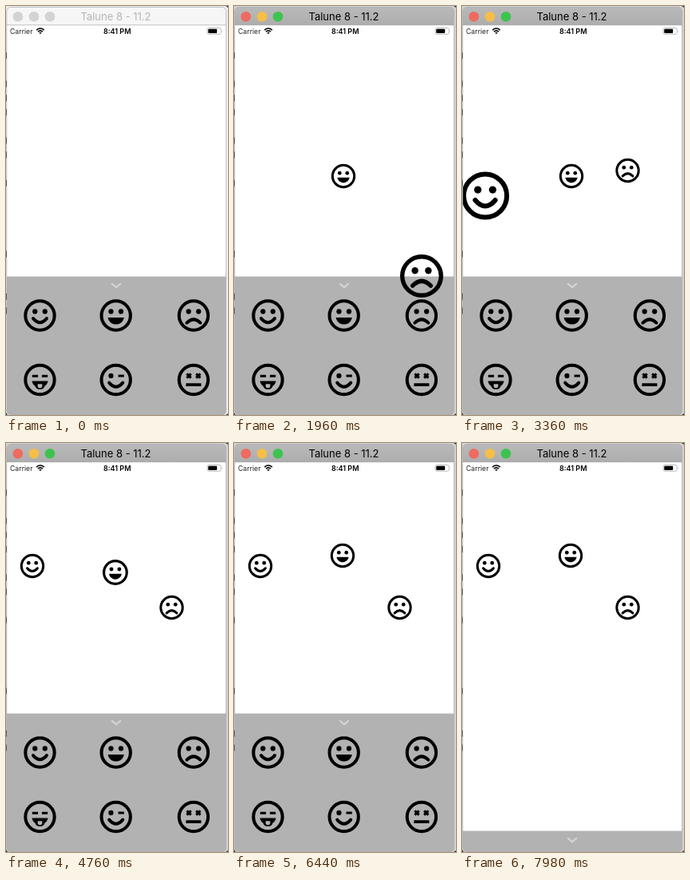
These frames come from a looping animation (278 by 512 pixels, 8000 ms). An HTML page:

```html
<!DOCTYPE html>
<html lang="en">
<head>
<meta charset="utf-8">
<title>Sticker tray</title>
<style>
  html, body { margin: 0; height: 100%; overflow: hidden; background: #fff; }
  svg { display: block; width: 100vw; height: 100vh; }
  text { font-family: Inter, "Liberation Sans", sans-serif; }
  .line { fill: none; stroke: #000; stroke-width: 2; stroke-linecap: round; }
  .thin { fill: none; stroke: #000; stroke-width: 1.5; }
  .inactive .lights circle { fill: #d3d3d3; }
  .inactive #bar { fill: #f6f6f6; }
  .inactive #title { fill: #b4b4b4; }
  .inactive #backdrop { fill: #efefef; }
</style>
</head>
<body>
<svg id="stage" viewBox="0 0 278 512">
  <defs>
    <linearGradient id="barFill" x2="0" y2="1">
      <stop stop-color="#bababa"/><stop offset="1" stop-color="#adadad"/>
    </linearGradient>
    <clipPath id="windowShape"><rect x="1" y="1.5" width="274.5" height="510.5" rx="5"/></clipPath>

    <!-- Faces are centred on 0,0 with an outer radius of 10. -->
    <circle id="ring" r="9" class="line"/>
    <circle id="eye" cy="-2.5" r="1.55"/>
    <g id="eyes"><use href="#eye" x="-3.1"/><use href="#eye" x="3.1"/></g>
    <path id="curve" class="line" d="M-4.2 1.8Q0 6.8 4.2 1.8"/>
    <path id="cross" class="thin" d="M-1.3-3.8l2.6 2.6m0-2.6l-2.6 2.6"/>
    <g id="smile"><use href="#ring"/><use href="#eyes"/><use href="#curve"/></g>
    <g id="grin"><use href="#ring"/><use href="#eyes"/><path d="M-5 1.2H5C4 6.9-4 6.9-5 1.2"/></g>
    <g id="sad"><use href="#ring"/><use href="#eyes"/><path class="line" d="M-4.2 4.5Q0 .3 4.2 4.5"/></g>
    <g id="tongue"><use href="#ring"/>
      <path class="thin" d="M-4.8-2.4h3.6M1.2-2.4h3.6"/>
      <path fill-rule="evenodd" d="M-5 .8H5Q4.4 3.2 2.9 3.9A3 2.6 0 0 1-2.9 3.9Q-4.4 3.2-5 .8M-1.4 2.6v1.2a1.4 1.2 0 0 0 2.8 0v-1.2z"/></g>
    <g id="wink"><use href="#ring"/><use href="#eye" x="-3.1"/>
      <path class="thin" d="M1.4-2.5h3.6"/><use href="#curve"/></g>
    <g id="dead"><use href="#ring"/><use href="#cross" x="-2.9"/><use href="#cross" x="2.9"/>
      <path class="thin" style="stroke-width:1.9" d="M-4.7 3H4.7"/></g>
  </defs>

  <rect id="backdrop" width="278" height="512" fill="#d2d2d2"/>
  <path d="M275 0h3v2zM275 512h3v-2zM0 512h2l-2-3z" fill="#333"/>
  <g id="specks"></g>

  <g clip-path="url(#windowShape)">
    <rect width="278" height="512" fill="#fff"/>
    <rect id="bar" width="278" height="24" fill="url(#barFill)"/>
    <path d="M0 23.8H278" stroke="#a9a9a9" stroke-width=".7"/>
    <g class="lights">
      <circle cx="14.9" cy="13.2" r="6.3" fill="#ef6a60"/>
      <circle cx="35" cy="13.2" r="6.3" fill="#f6be47"/>
      <circle cx="55" cy="13.2" r="6.3" fill="#3cc44f"/>
    </g>
    <text id="title" x="137.5" y="18" font-size="13" text-anchor="middle">Talune 8 - 11.2</text>

    <text x="5" y="34.6" font-size="8.7" fill="#222">Carrier</text>
    <g fill="none" stroke="#000" stroke-width="1.6">
      <path d="M38.2 30.2Q43 25.8 47.8 30.2M40 32.2Q43 29.4 46 32.2"/>
      <path d="M43 35.2l-1.7-1.9q1.7-1.2 3.4 0z" fill="#000" stroke="none"/>
    </g>
    <text x="139.2" y="34.7" font-size="9" font-weight="600" text-anchor="middle">8:41 PM</text>
    <rect x="252" y="27.5" width="17.2" height="7.8" rx="2" fill="none" stroke="#aaa" stroke-width=".8"/>
    <rect x="253.2" y="28.7" width="11" height="5.4" rx="1"/>
    <path d="M270.4 30v2.6q1.2-1.3 0-2.6" fill="#aaa"/>

    <g id="tray">
      <rect width="278" height="180" fill="#b2b2b2"/>
      <path d="M132.8 9.3L138 13.6L143.2 9.3" fill="none" stroke="#d2d2d2" stroke-width="2.4" stroke-linecap="round"/>
    </g>
    <g id="stickers"></g>
  </g>
  <rect x=".8" y="1.5" width="274.8" height="510.5" rx="5" fill="none" stroke="#a8a8a8" stroke-width=".7"/>
</svg>
<script>
const LOOP = 8000, STEP = 70;
const TRAY_OPEN = 338.6, TRAY_CLOSED = 485.6;
const TRAY_RADIUS = 20.2, NEW_RADIUS = 27, HELD_RADIUS = 30, PLACED_RADIUS = 15.2;
const GROW_TIME = 150, SETTLE_TIME = 120;

// A sticker moves between grab and arrive, and shrinks into place after release.
const drags = [
  { face: "grin", grab: 350, arrive: 910, release: 1000, from: [137, 342], to: [137, 213] },
  { face: "sad", grab: 1960, arrive: 2310, release: 2330, from: [235, 338], to: [207.5, 206] },
  { face: "smile", grab: 3150, arrive: 3780, release: 4120, from: [42, 342], to: [33, 154], bend: -8 },
  { face: "grin", grab: 4740, arrive: 5180, release: 5440, from: [137, 164], to: [136, 141], radius: PLACED_RADIUS }
];

const byId = id => document.getElementById(id);

function addNode(parent, tag, attributes) {
  const node = document.createElementNS("http://www.w3.org/2000/svg", tag);
  for (const name in attributes) node.setAttribute(name, attributes[name]);
  return byId(parent).appendChild(node);
}

const mix = (a, b, part) => a + (b - a) * part;
const progress = (time, start, length) => Math.min(1, Math.max(0, (time - start) / length));
const easeOut = p => 1 - (1 - p) ** 2;
const easeInOut = p => p * p * (3 - 2 * p);
const place = (x, y, radius) => `translate(${x} ${y}) scale(${radius / 10})`;

["smile", "grin", "sad", "tongue", "wink", "dead"].forEach((face, i) =>
  addNode("tray", "use", {
    href: "#" + face,
    transform: place(42.5 + 96.2 * (i % 3) - (i % 3 === 1), i < 3 ? 48.9 : 129.4, TRAY_RADIUS)
  }));

// Line ends of a text page that show beside the window.
[..."x.xxx.xx.x....x..xx"].forEach((mark, row) => {
  if (mark === "x")
    addNode("specks", "rect", { y: 58 + 17.75 * row, width: 1.2, height: 8, fill: "#111" });
});

const stickers = {};
for (const { face } of drags)
  stickers[face] ??= addNode("stickers", "use", { href: "#" + face });

function poseOf({ grab, arrive, release, from, to, bend = 0, radius = NEW_RADIUS }, time) {
  const moved = easeOut(progress(time, grab, arrive - grab));
  const held = mix(radius, HELD_RADIUS, easeInOut(progress(time, grab, GROW_TIME)));
  return [
    mix(from[0], to[0], moved) + bend * 4 * moved * (1 - moved),
    mix(from[1], to[1], moved),
    mix(held, PLACED_RADIUS, easeInOut(progress(time, release, SETTLE_TIME)))
  ];
}

function draw(now) {
  const time = Math.floor(now % LOOP / STEP) * STEP;
  byId("stage").classList.toggle("inactive", time < 70);

  for (const face in stickers) {
    const drag = drags.findLast(d => d.face === face && d.grab <= time);
    stickers[face].style.display = drag ? "" : "none";
    if (drag) stickers[face].setAttribute("transform", place(...poseOf(drag, time)));
  }

  const trayTop = mix(TRAY_OPEN, TRAY_CLOSED, easeInOut(progress(time, 6655, 300)));
  byId("tray").setAttribute("transform", `translate(0 ${trayTop})`);
}

const start = performance.now();
function tick() {
  draw(performance.now() - start);
  requestAnimationFrame(tick);
}
tick();
</script>
</body>
</html>
```
